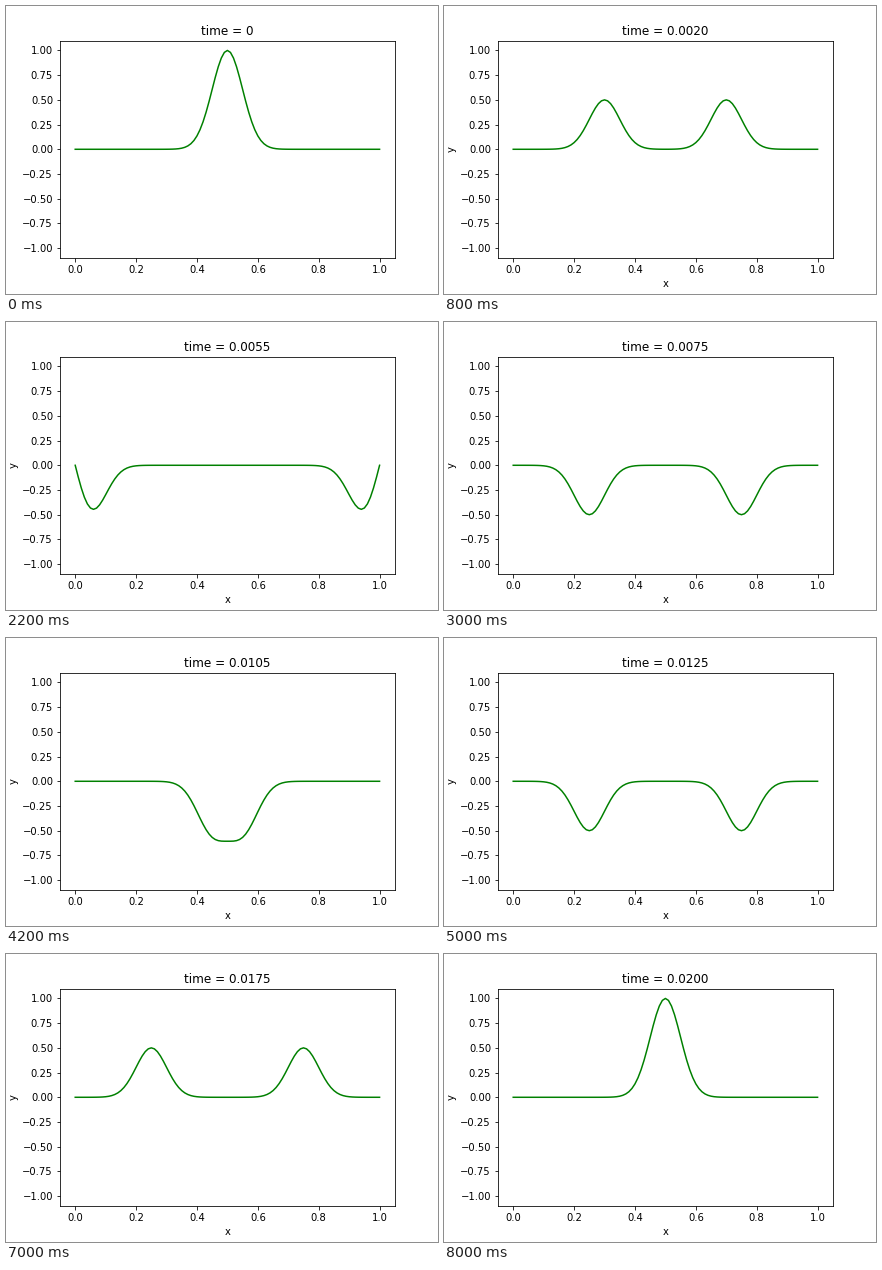
Animation of 432 by 288 pixels, one loop 8.2 s. Source, as a matplotlib script:

```python
import numpy as np
import matplotlib.pyplot as plt
from matplotlib.animation import FuncAnimation

FRAMES = 41
INTERVAL = 200      # ms
DT = 0.0005         # simulated time per frame
SPEED = 100
SIGMA = 0.05

x = np.linspace(0, 1, 101)


def pulse(s):
    """Gaussian at 0.5, extended as an odd function of period 2."""
    s = np.mod(s, 2)
    sign = np.where(s > 1, -1, 1)
    s = np.where(s > 1, 2 - s, s)
    return sign * np.exp(-((s - 0.5) / SIGMA) ** 2 / 2)


def wave(t):
    """String with fixed ends, released at rest (d'Alembert)."""
    y = (pulse(x - SPEED * t) + pulse(x + SPEED * t)) / 2
    y[[0, -1]] = 0
    return y


plt.rcParams["font.family"] = "DejaVu Sans"
fig, ax = plt.subplots(figsize=(6, 4), dpi=72, facecolor="white")
fig.subplots_adjust(left=0.125, right=0.9, bottom=0.125, top=0.88)
line, = ax.plot(x, wave(0), color="green", lw=1.5)
ax.set_xlim(-0.05, 1.05)
ax.set_ylim(-1.1, 1.1)


def update(i):
    t = i * DT
    line.set_ydata(wave(t))
    ax.set_title(f"time = {t:.4f}" if i else "time = 0")
    ax.set_xlabel("x" if i else "")
    ax.set_ylabel("y" if i else "")
    return line,


anim = FuncAnimation(fig, update, frames=FRAMES, interval=INTERVAL,
                     repeat=True, repeat_delay=0, blit=False)
plt.show()
```
